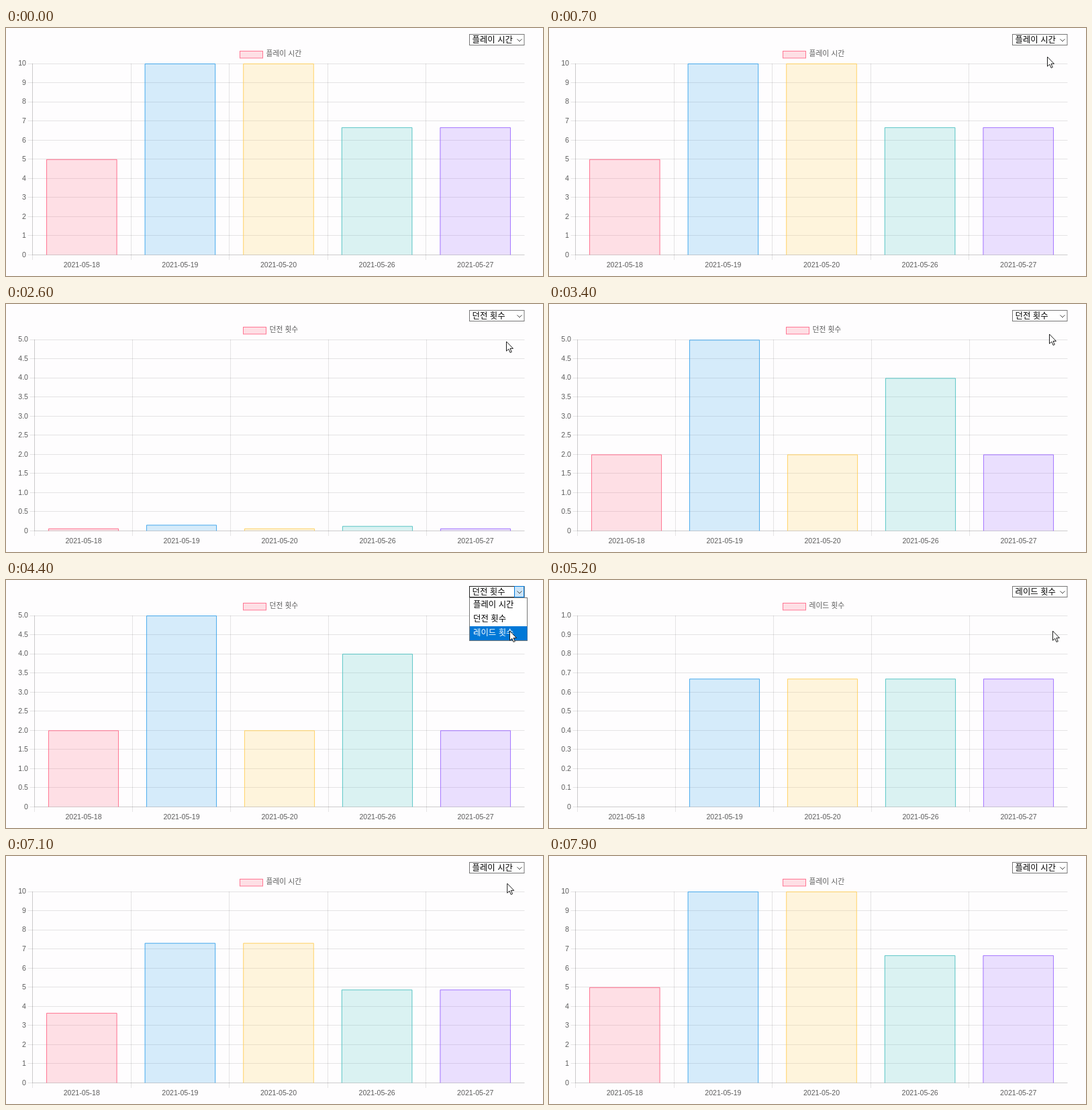
These frames come from a looping animation (800x370 px, 9.1 s). An HTML page:

```html
<!DOCTYPE html>
<html lang="ko">
<head>
<meta charset="utf-8">
<title>차트</title>
<style>
  html, body { margin: 0; width: 800px; height: 370px; overflow: hidden; background: #fefdfe; }
  svg { display: block; }
  text { font: 10.6px "Liberation Sans", Arial, sans-serif; fill: #5c5c5c; white-space: pre; }
  text.ko { font: 10.8px "Noto Sans CJK KR", "Noto Sans CJK", sans-serif; }
  text.ui { font: 12.4px "Noto Sans CJK KR", "Noto Sans CJK", sans-serif; fill: #000; }
</style>
</head>
<body>
<svg id="stage" width="800" height="370" viewBox="0 0 800 370"></svg>
<script>
const LOOP = 9100, STEP = 100;
const TOP = 53, BOTTOM = 338.5, RIGHT = 772.5;
const COLORS = ['255,99,132', '54,162,235', '255,206,86', '75,192,192', '153,102,255'];
const DATES = ['2021-05-18', '2021-05-19', '2021-05-20', '2021-05-26', '2021-05-27'];
const CHARTS = [
  { name: '플레이 시간', left: 39.5, max: 10, digits: 0, legend: 348, values: [5, 10, 10, 20 / 3, 20 / 3] },
  { name: '던전 횟수', left: 42.5, max: 5, digits: 1, legend: 353, values: [2, 5, 2, 4, 2] },
  { name: '레이드 횟수', left: 42.5, max: 1, digits: 1, legend: 348, values: [0, 1, 1, 1, 1] }
];
// shown from `at`, bars grow from `grow`
const SHOWN = [
  { at: 0, grow: -2000, chart: 0 },
  { at: 2600, grow: 2592, chart: 1 },
  { at: 4900, grow: 4958, chart: 2 },
  { at: 6800, grow: 6820, chart: 0 }
];
const MENUS = [[1050, 2600], [3750, 4900], [6150, 6800]];
const POINTER = [
  [200, 758, 344], [700, 742, 43], [900, 740, 15], [1800, 740, 15], [2200, 745, 56],
  [3000, 745, 56], [3400, 745, 45], [3500, 745, 45], [3700, 741, 15], [3900, 741, 15],
  [4400, 750, 76], [5800, 750, 76], [6100, 732, 21], [6400, 729, 19], [6600, 734, 34],
  [7000, 734, 34], [7400, 783, 62]
];

const stage = document.getElementById('stage');
const clamp = v => Math.min(1, Math.max(0, v));
const easeOutQuart = p => 1 - (1 - p) ** 4;
const rect = (x, y, w, h, attrs) => `<rect x="${x}" y="${y}" width="${w}" height="${h}" ${attrs}/>`;
const path = (d, attrs) => `<path d="${d}" ${attrs}/>`;
const text = (x, y, value, attrs = '') => `<text x="${x}" y="${y}" ${attrs}>${value}</text>`;

function pointerAt(t) {
  const next = POINTER.findIndex(p => p[0] > t);
  if (next === 0 || t > POINTER.at(-1)[0]) return null;
  if (next < 0) return POINTER.at(-1).slice(1);
  const [t0, x0, y0] = POINTER[next - 1], [t1, x1, y1] = POINTER[next];
  const p = (t - t0) / (t1 - t0);
  return [x0 + (x1 - x0) * p, y0 + (y1 - y0) * p];
}

function drawGrid({ left, max, digits }) {
  const slot = (RIGHT - left) / 5;
  const line = 'stroke="#000" stroke-opacity=".1"';
  let out = '';
  for (let i = 0; i <= 10; i++) {
    const y = BOTTOM - (BOTTOM - TOP) * i / 10;
    const gridY = Math.floor(y) + .5;
    out += path(`M${left - 7} ${gridY}H${RIGHT}`, line);
    out += text(left - 9.5, y + 3.3, i ? (max * i / 10).toFixed(digits) : 0, 'text-anchor="end"');
  }
  DATES.forEach((date, i) => {
    const x = left + slot * i;
    out += path(`M${Math.floor(x) + .5} ${TOP}V346`, line);
    out += text(x + slot / 2, 356.6, date, 'text-anchor="middle"');
  });
  return out + path(`M${left} ${TOP}V${BOTTOM}H${RIGHT}`, `fill="none" ${line}`);
}

function drawBars({ left, max, values }, progress) {
  const slot = (RIGHT - left) / 5, width = slot * .72;
  return values.map((value, i) => {
    if (!value) return '';
    const x = left + slot * (i + .5) - width / 2;
    const height = (BOTTOM - TOP) * value / max * progress;
    const edge = `M${x + .5} ${BOTTOM}V${BOTTOM - height + .5}H${x + width - .5}V${BOTTOM}`;
    return rect(x, BOTTOM - height, width, height, `fill="rgba(${COLORS[i]},.2)"`) +
      path(edge, `fill="none" stroke="rgb(${COLORS[i]})" stroke-opacity=".85"`);
  }).join('');
}

function drawLegend({ name, legend }) {
  return rect(legend + .5, 34.5, 34, 10.4, `fill="rgba(${COLORS[0]},.2)" stroke="rgb(${COLORS[0]})" stroke-opacity=".85"`) +
    text(legend + 39.5, 42, name, 'class="ko"');
}

function drawTooltip({ name }, opacity) {
  if (opacity <= 0) return '';
  return `<g opacity="${opacity}">` +
    rect(605, 32.5, 88, 41, 'rx="5" fill="#000" fill-opacity=".8"') +
    path('M693 48.5L698 53L693 57.5Z', 'fill="#000" fill-opacity=".8"') +
    text(610.5, 47, DATES[4], 'style="fill:#fff;font-weight:bold"') +
    rect(611, 56, 10, 10, `fill="rgb(${COLORS[4]})" stroke="#fff"`) +
    text(624, 65, `${name}: 1`, 'class="ko" style="fill:#fff"') + '</g>';
}

function drawSelect(name, active) {
  const arrow = path('M761.5 16.5L765 20L768.5 16.5', 'fill="none" stroke="#444"');
  const button = active ? rect(757.5, 9.5, 14, 16, 'fill="#cce4f7" stroke="#0078d7"') : '';
  return rect(690.5, 9.5, 81.5, 16, `fill="#fff" stroke="${active ? '#222' : '#767676'}"`) +
    text(694.5, 22.3, name, 'class="ui"') + button + arrow;
}

function drawMenu(selected, pointer, opacity) {
  const hovered = Math.floor((pointer[1] - 27) / 21);
  const active = hovered >= 0 && hovered < 3 ? hovered : selected;
  return `<g opacity="${opacity}">` + rect(690.5, 26.5, 86, 64, 'fill="#fff" stroke="#777"') +
    CHARTS.map(({ name }, i) =>
      (i === active ? rect(691, 27 + 21 * i, 85.5, 21, 'fill="#0078d7"') : '') +
      text(696, 41.3 + 21 * i, name, `class="ui" ${i === active ? 'style="fill:#fff"' : ''}`)
    ).join('') + '</g>';
}

function drawPointer([x, y]) {
  return path('M0 0V14.2L3.3 11.2L5.6 16.5L7.8 15.5L5.5 10.4H10Z',
    `transform="translate(${x + .5} ${y})" fill="#fff" stroke="#111" stroke-width=".95"`);
}

function render(t) {
  const shown = SHOWN.findLast(s => t >= s.at);
  const chart = CHARTS[shown.chart];
  const pointer = pointerAt(t);
  const menu = MENUS.find(([from, to]) => t >= from && t < to);
  const overSelect = pointer && pointer[1] < 26;
  const tooltip = Math.min((t - 5830) / 200, (6190 - t) / 200, 1);
  stage.innerHTML = drawGrid(chart) +
    drawBars(chart, easeOutQuart(clamp((t - shown.grow) / 1000))) +
    drawLegend(chart) + drawTooltip(chart, tooltip) +
    drawSelect(chart.name, menu || overSelect) +
    (menu ? drawMenu(shown.chart, pointer, clamp((t - menu[0]) / 200)) : '') +
    (pointer ? drawPointer(pointer) : '');
}

const start = performance.now();
let last = -1;
function tick() {
  const t = Math.floor((performance.now() - start) % LOOP / STEP) * STEP;
  if (t !== last) render(last = t);
  requestAnimationFrame(tick);
}
tick();
</script>
</body>
</html>
```
